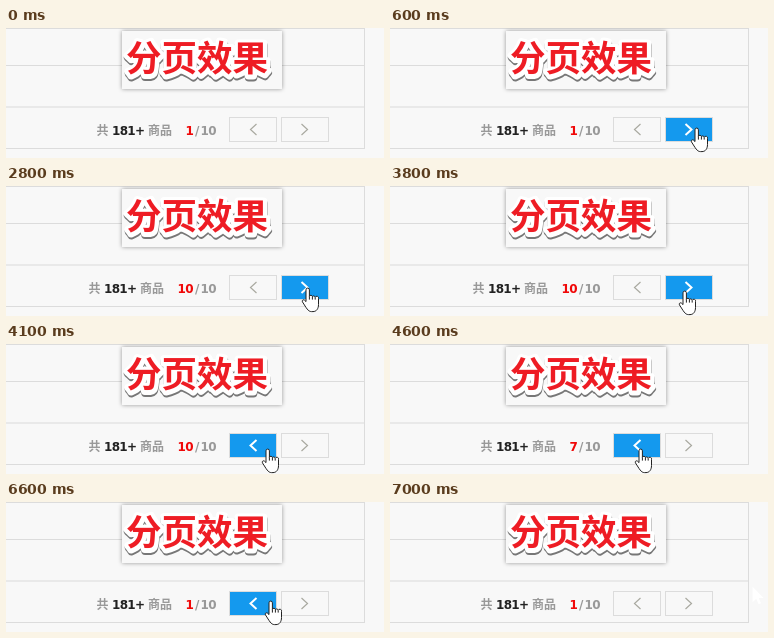
An HTML page for the animation above (7.8 s loop, 378 by 130 pixels).

```html
<!DOCTYPE html>
<html lang="zh-CN">
<head>
<meta charset="utf-8">
<title>分页效果</title>
<style>
  html, body { margin: 0; width: 100%; height: 100%; overflow: hidden; background: #f8f8f8; }
  svg { display: block; }
  .line { fill: #dcdcdc; }
  .card { fill: #f8f8f8; filter: drop-shadow(0 0 2px rgba(0, 0, 0, .4)); }
  .title { font: bold 35.5px "Noto Sans CJK SC", "Noto Sans CJK", sans-serif; stroke-linejoin: round; }
  .title .edge { fill: #777; stroke: #777; stroke-width: 8; }
  .title .halo { fill: #fff; stroke: #fff; stroke-width: 8; }
  .title .face { fill: #ee1c24; }
  .cn { font: bold 12px "Noto Sans CJK SC", "Noto Sans CJK", sans-serif; fill: #999; }
  .num { font: bold 12px "DejaVu Sans", sans-serif; letter-spacing: -.7px; fill: #222; }
  .num.page { fill: #f00808; }
  .num.all { fill: #999; }
  .btn rect { fill: #f8f8f8; stroke: #dcdcdc; }
  .btn path { fill: none; stroke: #a9a9a0; stroke-width: 1.2; }
  .btn.on rect { fill: #1499ee; }
  .btn.on path { stroke: #fff; stroke-width: 2; }
  .pointer { fill: #fff; stroke: #222; stroke-linejoin: round; }
  .trace { stroke: none; }
</style>
</head>
<body>
<svg width="378" height="130" viewBox="0 0 378 130">
  <defs>
    <text id="heading" x="120" y="42.8">分页效果</text>
  </defs>

  <g class="line">
    <rect width="359" height="1"/>
    <rect y="37" width="359" height="1"/>
    <rect y="78.5" width="359" height="1"/>
    <rect y="120" width="359" height="1"/>
    <rect x="358" width="1" height="121"/>
  </g>

  <rect class="card" x="116" y="3" width="160" height="58"/>
  <g class="title">
    <use class="edge" href="#heading" x=".7" y="2.8"/>
    <use class="halo" href="#heading" x=".4" y="1.4"/>
    <use class="face" href="#heading"/>
  </g>

  <g id="count">
    <text class="cn" x="90.5" y="107">共</text>
    <text class="num" x="106" y="107">181+</text>
    <text class="cn" x="142" y="107">商品</text>
    <text class="num page" id="page" x="179.5" y="107">1</text>
  </g>
  <text class="num all" x="189" y="107">/</text>
  <text class="num all" x="194.5" y="107">10</text>

  <g class="btn" id="prev">
    <rect x="223.5" y="89.5" width="47" height="24"/>
    <path d="M250.5 96l-6 5.5l6 5.5"/>
  </g>
  <g class="btn" id="next">
    <rect x="275.5" y="89.5" width="47" height="24"/>
    <path d="M295.5 96l6 5.5l-6 5.5"/>
  </g>

  <g class="pointer" id="pointer">
    <path id="arrow" d="M.6 .8V16.2L4.2 12.8L6.6 18.3L9 17.3L6.7 11.9H11.6Z"/>
    <g id="hand" transform="translate(-6.5 .6)">
      <path d="M4.5 14V2.2a1.7 1.7 0 0 1 3.4 0V8.6a1.6 1.6 0 0 1 3 .3a1.6 1.6 0 0 1 2.8 .9a1.6 1.6 0 0 1 3.3 1.2V17c0 4-2 7-5.5 7H10C6.5 24 5 20.5 .9 14.2q-.5-1.6 .8-2q1.2-.2 2.8 1.8Z"/>
      <path fill="none" d="M7.9 8.6V12M10.9 9V12M13.7 10V12"/>
    </g>
  </g>
</svg>
<script>
  const LOOP = 7800;
  const STEP = 100;
  const LEAVE = 7000;

  // Pointer tip: time, x, y, easing power on the way to the next key
  const keys = [
    { t: 300, x: 343, y: 83, out: 1.5 },
    { t: 700, x: 302, y: 101 },
    { t: 3700, x: 302, y: 101 },
    { t: 3800, x: 295, y: 104 },
    { t: 4200, x: 251, y: 104 },
    { t: 4600, x: 251, y: 104 },
    { t: 5100, x: 251, y: 100 },
    { t: 6500, x: 251, y: 100, in: 1.5 },
    { t: 6900, x: 362, y: 84 }
  ];

  const $ = id => document.getElementById(id);
  const show = (el, on) => el.setAttribute('visibility', on ? 'visible' : 'hidden');
  const clamp = (v, low, high) => Math.min(high, Math.max(low, v));
  const start = performance.now();

  // Clicks made by time t in a steady run
  const clicks = (t, first, every, most) => clamp(Math.floor((t - first) / every) + 1, 0, most);

  function tip(t) {
    const i = keys.filter(k => k.t <= t).length - 1;
    if (i < 0) return { x: -99, y: -99 };
    const a = keys[i];
    const b = keys[i + 1] || a;
    const p = (t - a.t) / (b.t - a.t || 1);
    const e = b === a ? 0 : a.out ? 1 - (1 - p) ** a.out : p ** (a.in || 1);
    return { x: a.x + (b.x - a.x) * e, y: a.y + (b.y - a.y) * e };
  }

  function draw(t) {
    const up = clicks(t, 900, LOOP, 1) + clicks(t, 1400, 200, 8);
    const page = 1 + up - clicks(t, 4180, 174, 9);
    $('page').textContent = page;
    $('count').setAttribute('transform', `translate(${page > 9 ? -8 : 0} 0)`);

    const { x, y } = tip(t);
    const over = left => t < LEAVE && y >= 89 && x >= left && x < left + 48;
    const onPrev = over(223);
    const onNext = over(275);
    $('prev').classList.toggle('on', onPrev);
    $('next').classList.toggle('on', onNext);

    $('pointer').setAttribute('transform', `translate(${Math.round(x)} ${Math.round(y)})`);
    $('arrow').classList.toggle('trace', t >= LEAVE);
    show($('hand'), onPrev || onNext);
    show($('arrow'), !onPrev && !onNext);
  }

  function tick() {
    const t = (performance.now() - start) % LOOP;
    draw(Math.floor(t / STEP) * STEP);
    requestAnimationFrame(tick);
  }
  tick();
</script>
</body>
</html>
```
